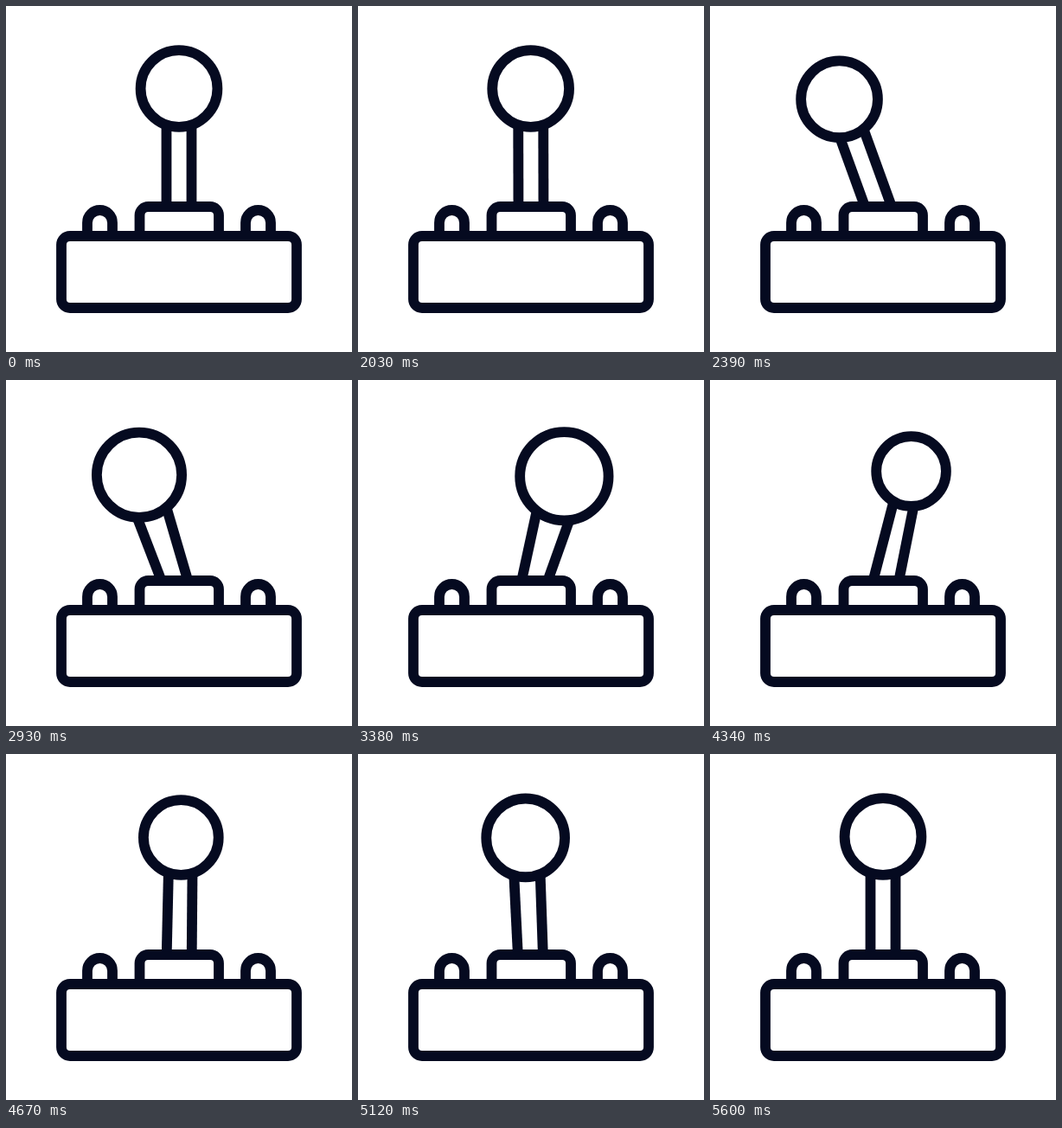
Animation of 400 by 400 pixels, one loop 5630 ms. Source, as an HTML page with a canvas:

```html
<!DOCTYPE html>
<html lang="en">
<head>
<meta charset="utf-8">
<title>Joystick</title>
<style>
  html, body { margin: 0; width: 100%; height: 100%; overflow: hidden; background: #fff; }
  canvas { display: block; width: 400px; height: 400px; }
</style>
</head>
<body>
<canvas id="stage" width="400" height="400"></canvas>
<script>
const ctx = document.getElementById('stage').getContext('2d');
const INK = '#050a20';
const LOOP = 5630, START = 2030, STEP = 30;
const PIVOT = { x: 200, y: 247 };
const REST = { y: 95.5, radius: 44.4, half: 14.5 };

// The knob circles left, front, right, back, then repeats a small loop and settles.
// Each stop is [time, value]; growth is the radius gained by coming nearer.
const SWING = [[2000, 0], [2570, -63], [2650, -63], [3720, 64], [3740, 64],
  [5050, -10], [5280, 10], [5500, -1.5], [5600, 0]];
const GROWTH = [[2700, 0], [3140, 8.7], [4040, -5], [5100, 1], [5400, 0]];

function ease(p) {
  const a = Math.pow(p, 1.8), b = Math.pow(1 - p, 1.8);
  return a / (a + b);
}

function valueAt(stops, t) {
  const next = stops.findIndex(stop => stop[0] > t);
  if (next === 0) return stops[0][1];
  if (next < 0) return stops[stops.length - 1][1];
  const [t0, v0] = stops[next - 1], [t1, v1] = stops[next];
  return v0 + (v1 - v0) * ease((t - t0) / (t1 - t0));
}

function knobAt(t) {
  const swing = valueAt(SWING, t), growth = valueAt(GROWTH, t);
  const tilt = Math.hypot(swing, growth * 7);
  return {
    x: PIVOT.x + swing,
    y: REST.y + 0.075 * Math.pow(tilt, 1.3),
    r: REST.radius + growth
  };
}

function paint() {
  ctx.fill();
  ctx.stroke();
}

function drawLever({ x, y, r }) {
  const dx = x - PIVOT.x, dy = y - PIVOT.y;
  const length = Math.hypot(dx, dy);
  const ux = dx / length, uy = dy / length;
  const baseY = 232;
  const baseX = PIVOT.x + dx * (baseY - PIVOT.y) / dy;
  const baseHalf = REST.half / uy;
  const topX = x - ux * r * 0.94, topY = y - uy * r * 0.94;
  const topHalf = REST.half * Math.pow(r / REST.radius, 2.1);

  for (const side of [-1, 1]) {
    ctx.beginPath();
    ctx.moveTo(baseX - baseHalf * side, baseY);
    ctx.lineTo(topX - uy * topHalf * side, topY + ux * topHalf * side);
    ctx.stroke();
  }
  ctx.beginPath();
  ctx.arc(x, y, r, 0, Math.PI * 2);
  paint();
}

function drawButton(x) {
  ctx.beginPath();
  ctx.moveTo(x - 14.5, 266);
  ctx.arc(x, 250.5, 14.5, Math.PI, 0);
  ctx.lineTo(x + 14.5, 266);
  paint();
}

function drawBase() {
  drawButton(108.5);
  drawButton(291.5);

  ctx.beginPath();
  ctx.moveTo(154.5, 266);
  ctx.arcTo(154.5, 232, 200, 232, 10);
  ctx.arcTo(246, 232, 246, 266, 10);
  ctx.lineTo(246, 266);
  paint();

  ctx.beginPath();
  ctx.roundRect(64, 266, 272, 83, 10);
  paint();
}

function draw(now) {
  const t = now % LOOP;
  const held = t < START ? 0 : t - (t - START) % STEP;
  ctx.fillStyle = '#fff';
  ctx.strokeStyle = INK;
  ctx.lineWidth = 11.8;
  ctx.fillRect(0, 0, 400, 400);
  drawLever(knobAt(held));
  drawBase();
}

let origin;
function frame(now) {
  origin ??= now;
  draw(now - origin);
  requestAnimationFrame(frame);
}
draw(0);
requestAnimationFrame(frame);
</script>
</body>
</html>
```
